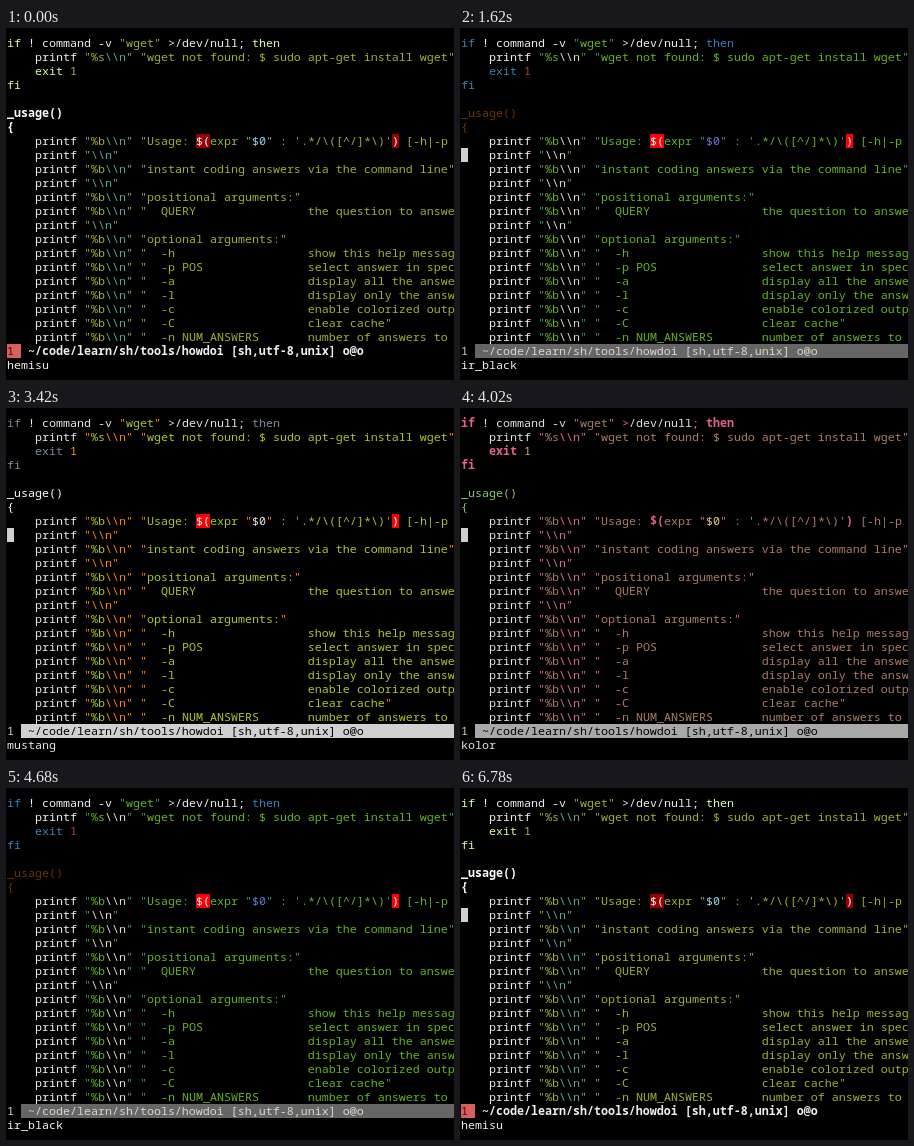
An HTML page for the animation above (7170 ms loop, 448 px wide and 352 px high).

```html
<!DOCTYPE html>
<html lang="en">
<head>
<meta charset="utf-8">
<title>Colour scheme switcher</title>
<style>
html, body { margin: 0; width: 100%; height: 100%; overflow: hidden; background: #000; }
svg { display: block; width: 448px; height: 352px; }
text { font: 11.667px "Noto Sans Mono", "DejaVu Sans Mono", monospace; white-space: pre; }
.n { fill: var(--n); }
.k { fill: var(--k); font-weight: var(--kw); }
.o { fill: var(--o); }
.s { fill: var(--s); }
.q { fill: var(--q); }
.e { fill: var(--e); }
.d { fill: var(--d); }
.v { fill: var(--v); }
.f { fill: var(--f); font-weight: var(--fw); }
.x { fill: var(--x); font-weight: var(--kw); }
.id { fill: var(--id); }
.bar { fill: var(--bar); font-weight: var(--fw); }
.errBg { fill: var(--errBg); }
.idBg { fill: var(--idBg); }
.barBg { fill: var(--barBg); }
</style>
</head>
<body>
<svg id="stage" viewBox="0 0 448 352" xmlns="http://www.w3.org/2000/svg"></svg>
<script>
const LOOP = 7170, CELL_W = 7, CELL_H = 14, LEFT = 1, TOP = 8, BASE = 11;
const stage = document.getElementById('stage');

const themes = {
  hemisu: {
    n: '#eeeeee', k: '#d7ffaf', o: '#eeeeee', s: '#a0b030', q: '#8fa850', e: '#5fa89a', d: '#b0a878',
    v: '#9fd3e6', f: '#ffffff', x: '#ffffff', id: '#5f0000', bar: '#eeeeee',
    errBg: '#960000', idBg: '#d75f5f', barBg: '#000', kw: 400, fw: 700
  },
  ir_black: {
    n: '#f0f0f0', k: '#3f7fb8', o: '#f0f0f0', s: '#64b41e', q: '#3f9a5a', e: '#e0e0d0', d: '#a8483c',
    v: '#6478d8', f: '#703400', x: '#ffffff', id: '#d0d0d0', bar: '#dcd4c8',
    errBg: '#ff0000', idBg: '#000', barBg: '#666666', kw: 400, fw: 400
  },
  kolor: {
    n: '#e2e2e2', k: '#e6618a', o: '#d96e7a', s: '#ad7b67', q: '#d96e7a', e: '#d96e8a', d: '#d8a868',
    v: '#e8c890', f: '#88c877', x: '#e6618a', id: '#d0d0b0', bar: '#000000',
    errBg: 'none', idBg: '#000', barBg: '#a8a8a8', kw: 700, fw: 400
  },
  mustang: {
    n: '#e8e8ea', k: '#7e8aa2', o: '#e8e8ea', s: '#a8c828', q: '#ff8700', e: '#ff8700', d: '#ff9800',
    v: '#e8e8ea', f: '#ffffff', x: '#ffffff', id: '#d8d8d8', bar: '#000000',
    errBg: '#ff0000', idBg: '#000', barBg: '#d0d0d0', kw: 400, fw: 400
  }
};

// [start in ms, scheme]
const scenes = [
  [0, 'hemisu'], [1200, 'ir_black'], [1740, 'kolor'], [2610, 'mustang'],
  [3990, 'kolor'], [4440, 'ir_black'], [4830, 'hemisu']
];

// The cursor starts hidden and toggles at each time.
const blinks = [
  30, 270, 480, 720, 930, 1170, 1230, 1410, 1620, 1860, 2070, 2280,
  2520, 2730, 2970, 3180, 3420, 3630, 3840, 3990, 4020, 4050, 4260, 4440,
  4470, 4680, 4860, 5070, 5280, 5610, 5850, 6120, 6330, 6570, 6780
];

const quoted = (...inner) => [['q', '"'], ...inner, ['q', '"']];
const print = (...args) => [['n', '    printf '], ...args];
const say = (text, fmt = '%b') => print(
  ...quoted(['s', fmt], ['e', '\\\\n']), ['n', ' '], ...quoted(['s', text]));
const gap = () => print(...quoted(['e', '\\\\n']));
const option = (flag, help) => say('  ' + flag.padEnd(21) + help);

const rows = [
  [['k', 'if'], ['n', ' ! command -v '], ...quoted(['s', 'wget']), ['n', ' '],
    ['o', '>'], ['n', '/dev/null'], ['o', ';'], ['n', ' '], ['k', 'then']],
  say('wget not found: $ sudo apt-get install wget', '%s'),
  [['n', '    '], ['k', 'exit'], ['n', ' '], ['d', '1']],
  [['k', 'fi']],
  [],
  [['f', '_usage()']],
  [['f', '{']],
  print(...quoted(['s', '%b'], ['e', '\\\\n']), ['n', ' '], ['q', '"'], ['s', 'Usage: '],
    ['x', '$('], ['s', 'expr '], ...quoted(['v', '$0']), ['s', ' : '],
    ['q', "'"], ['s', '.*/\\([^/]*\\)'], ['q', "'"], ['x', ')'], ['s', ' [-h|-p POS]']),
  gap(),
  say('instant coding answers via the command line'),
  gap(),
  say('positional arguments:'),
  option('QUERY', 'the question to answer'),
  gap(),
  say('optional arguments:'),
  option('-h', 'show this help message'),
  option('-p POS', 'select answer in specified'),
  option('-a', 'display all the answer'),
  option('-l', 'display only the answer'),
  option('-c', 'enable colorized output'),
  option('-C', 'clear cache'),
  option('-n NUM_ANSWERS', 'number of answers to return'),
  [['id', '1'], ['n', '  '], ['bar', '~/code/learn/sh/tools/howdoi [sh,utf-8,unix] o@o']]
];

const colX = col => LEFT + col * CELL_W;
const rowY = row => TOP + row * CELL_H;

function add(tag, attrs, text = '') {
  const node = document.createElementNS('http://www.w3.org/2000/svg', tag);
  for (const key in attrs) node.setAttribute(key, attrs[key]);
  node.textContent = text;
  return stage.appendChild(node);
}

const box = (cls, col, row, cols) => add('rect', {
  class: cls, x: colX(col), y: rowY(row), width: cols * CELL_W, height: CELL_H
});
const label = (cls, col, row, text) => add('text', {
  class: cls, x: colX(col), y: rowY(row) + BASE
}, text);

box('idBg', 0, 22, 2);
box('barBg', 2, 22, 62);
rows.forEach((tokens, row) => {
  let col = 0;
  for (const [cls, text] of tokens) {
    if (cls === 'x') box('errBg', col, row, text.length);
    if (text.trim()) label(cls, col, row, text);
    col += text.length;
  }
});
const message = label('n', 0, 23, '');
const cursor = box('', 0, 8, 1);
cursor.setAttribute('fill', '#d0d0d0');

let shown = '';
function render(ms) {
  const t = ms % LOOP;
  const name = scenes.filter(([start]) => start <= t).pop()[1];
  if (name !== shown) {
    shown = name;
    for (const key in themes[name]) stage.style.setProperty('--' + key, themes[name][key]);
    message.textContent = name;
  }
  const on = blinks.filter(at => at <= t).length % 2;
  cursor.setAttribute('visibility', on ? 'visible' : 'hidden');
}

const began = performance.now();
function tick() {
  render(performance.now() - began);
  requestAnimationFrame(tick);
}
tick();
</script>
</body>
</html>
```
